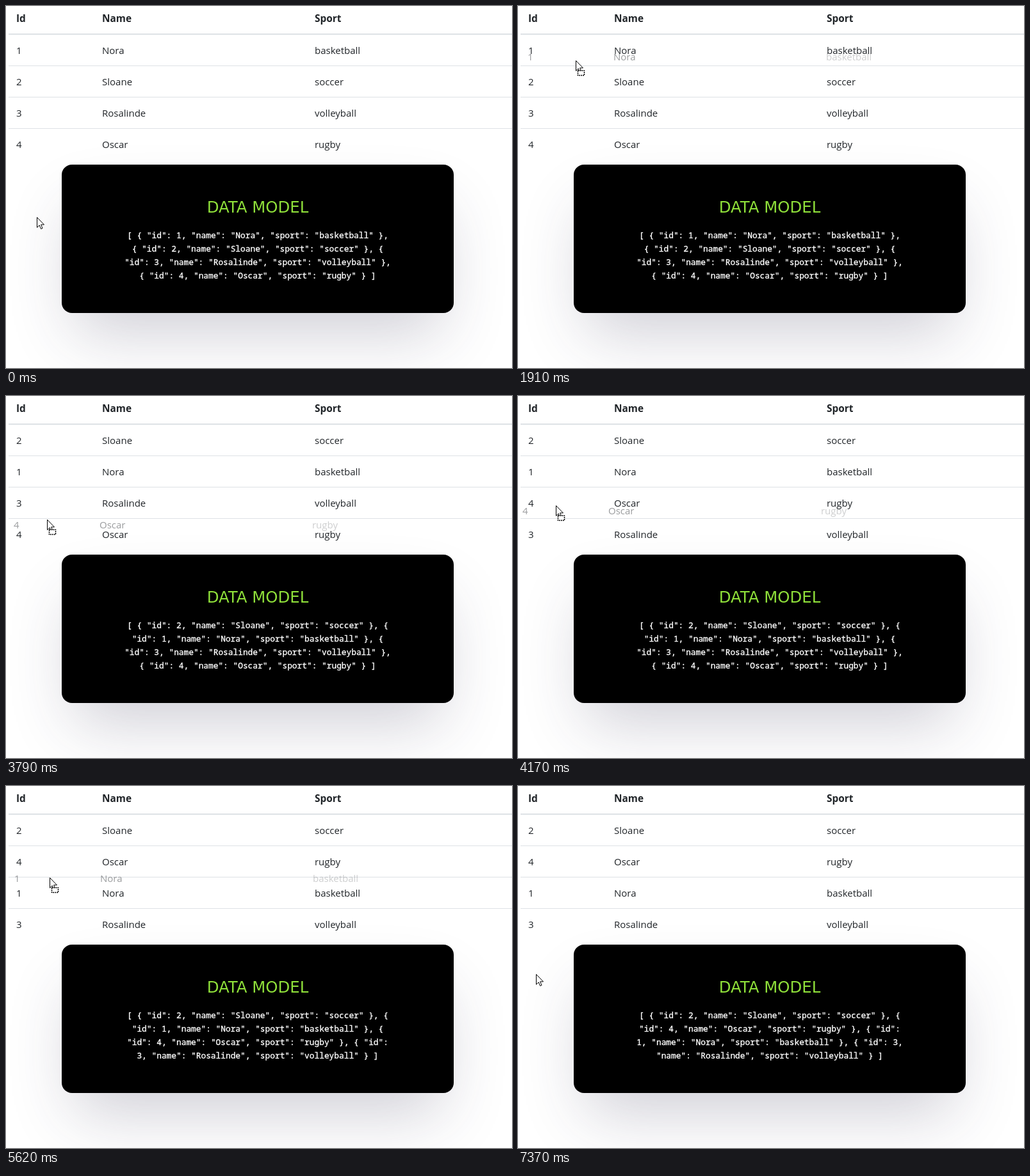
These frames come from a looping animation (790x566 px, 7690 ms). An HTML page:

```html
<!DOCTYPE html>
<html lang="en">
<head>
<meta charset="utf-8">
<title>Drag to reorder</title>
<style>
  html, body { margin: 0; width: 100%; height: 100%; overflow: hidden; background: #fff; }
  #card {
    position: absolute; left: 87px; top: 248px; width: 612px; height: 232px;
    border-radius: 16px; background: #000;
    box-shadow: 0 50px 100px -20px rgba(48, 42, 76, .23);
  }
  svg { position: absolute; left: 0; top: 0; }
  text { font: 15px "Open Sans", "Noto Sans", sans-serif; fill: #212529; }
  .head { font-size: 15.4px; font-weight: 700; }
  .title { font: 24.4px "DejaVu Sans", sans-serif; fill: #8fe03a; text-anchor: middle; }
  .model {
    font: 12.83px "Noto Sans Mono", "DejaVu Sans Mono", monospace;
    fill: #fff; stroke: #fff; stroke-width: .35; text-anchor: middle;
  }
  .line { fill: #dee2e6; }
  .cursor { fill: #fff; stroke: #000; stroke-width: 1; stroke-linejoin: round; }
</style>
</head>
<body>
<div id="card"></div>
<svg id="stage" width="790" height="566" viewBox="0 0 790 566"></svg>
<script>
const LOOP = 7690;
const COLS = [16, 150, 482];
const ROW_Y = 75, ROW_H = 49, TABLE_END = 241;
const SLOTS = [0, 1, 2, 3];
const PEOPLE = [
  ["1", "Nora", "basketball"],
  ["2", "Sloane", "soccer"],
  ["3", "Rosalinde", "volleyball"],
  ["4", "Oscar", "rugby"]
];

// Pointer moves; out = ease-out power (otherwise ease in and out), bend = sideways bulge
const HOME = { x: 48, y: 330 };
const MOVES = [
  { from: 525, to: 730, x: 38, y: 96 },
  { from: 975, to: 1470, x: 91, y: 75, out: 4, bend: [0, -4] },
  { from: 1785, to: 2230, x: 87, y: 124 },
  { from: 2860, to: 3350, x: 68, y: 210 },
  { from: 3680, to: 4120, x: 59, y: 171, out: 2 },
  { from: 4665, to: 4990, x: 71, y: 117, out: 4, bend: [-10, 0] },
  { from: 5470, to: 5800, x: 65, y: 177 },
  { from: 6220, to: 6370, x: 63, y: 171, out: 3 },
  { from: 6815, to: 7050, x: 28, y: 297 },
  { from: 7330, to: 7370, x: 28, y: 294, out: 3 }
];

// A dragged row trades slots at swap; the model follows at drop
const DRAGS = [
  { grab: 1800, swap: 1970, drop: 2430, slot: 0, goal: 1 },
  { grab: 3690, swap: 3820, drop: 4340, slot: 3, goal: 2 },
  { grab: 5480, swap: 5610, drop: 6340, slot: 1, goal: 2 }
];

const stage = document.getElementById("stage");

function add(parent, tag, attrs = {}, content = "") {
  const el = document.createElementNS("http://www.w3.org/2000/svg", tag);
  for (const key in attrs) el.setAttribute(key, attrs[key]);
  el.textContent = content;
  parent.appendChild(el);
  return el;
}
const rule = (y, height) => add(stage, "rect", { class: "line", x: 4, y, width: 786, height });
const cells = (parent, y) => COLS.map(x => add(parent, "text", { x, y }));

["Id", "Name", "Sport"].forEach((label, i) =>
  add(stage, "text", { class: "head", x: COLS[i], y: 25 }, label));
rule(43, 2);
for (let i = 0; i < 3; i++) rule(93 + i * ROW_H, 1);
const rows = SLOTS.map(i => cells(stage, ROW_Y + i * ROW_H));

add(stage, "text", { class: "title", x: 393, y: 323 }, "DATA MODEL");
const modelLines = SLOTS.map(i => add(stage, "text", { class: "model", x: 393, y: 363 + i * 21 }));

const ghost = add(stage, "g");
const ghostCells = cells(ghost, 0);
ghostCells.forEach((cell, i) => cell.setAttribute("opacity", i < 2 ? .45 : .22));

const pointer = add(stage, "g", { class: "cursor" });
const arrow = add(pointer, "path", {
  d: "M.5 .5V16.3L4.2 12.8L6.6 18.5L9 17.5L6.6 11.9H11.5Z"
});
const badge = add(pointer, "rect", {
  x: 3.5, y: 16, width: 10, height: 7.5, "stroke-width": 1.5, "stroke-dasharray": "2 1"
});
const hand = add(pointer, "path", {
  transform: "translate(-6 0)",
  d: "M5.5 14.5V2C5.5 0 8.5 0 8.5 2V9C8.5 7.3 11.5 7.3 11.5 9V9.8C11.5 8.2 14.3 8.2 14.3 10" +
     "V10.8C14.3 9.5 16.9 9.5 16.9 11.3V16.5C16.9 19 14.8 20 14.8 23.3H7C7 20.5 4 18.5 1 14.2" +
     "C-.2 12 2 11 3.5 12.5ZM8.5 9V13M11.5 9.8V13M14.3 10.8V13.5"
});

const show = (el, on) => el.setAttribute("visibility", on ? "visible" : "hidden");
const fill = (els, texts) => els.forEach((el, i) => {
  const text = texts[i] || "";
  if (el.textContent !== text) el.textContent = text;
});

// Row order once every drag whose given moment has passed is applied
function orderAt(t, moment) {
  const order = [...SLOTS];
  for (const { slot, goal, [moment]: time } of DRAGS) {
    if (t >= time) [order[slot], order[goal]] = [order[goal], order[slot]];
  }
  return order;
}

function wrap(text, limit) {
  const lines = [""];
  for (const word of text.split(" ")) {
    const last = lines[lines.length - 1];
    const next = last ? last + " " + word : word;
    if (next.length <= limit) lines[lines.length - 1] = next;
    else lines.push(word);
  }
  return lines;
}

function modelText(order) {
  const items = order.map(i => {
    const [id, name, sport] = PEOPLE[i];
    return `{ "id": ${id}, "name": "${name}", "sport": "${sport}" }`;
  });
  return wrap(`[ ${items.join(", ")} ]`, 54);
}

const ease = (k, out) => out ? 1 - (1 - k) ** out : k * k * (3 - 2 * k);

function tipAt(t) {
  let { x, y } = HOME;
  for (const m of MOVES) {
    if (t < m.from) break;
    const k = ease(Math.min(1, (t - m.from) / (m.to - m.from)), m.out);
    const [bx, by] = m.bend || [0, 0];
    const bulge = 4 * k * (1 - k);
    x += (m.x - x) * k + bx * bulge;
    y += (m.y - y) * k + by * bulge;
  }
  return [Math.round(x), Math.round(y)];
}

function draw(t) {
  const [x, y] = tipAt(t);
  const drag = DRAGS.find(d => t >= d.grab && t < d.drop);

  orderAt(t, "swap").forEach((person, i) => fill(rows[i], PEOPLE[person]));
  fill(modelLines, modelText(orderAt(t, "drop")));

  show(ghost, drag);
  if (drag) {
    const [gx, gy] = tipAt(drag.grab);
    const top = ROW_Y + drag.slot * ROW_H + y - gy;
    fill(ghostCells, PEOPLE[orderAt(drag.grab, "swap")[drag.slot]]);
    ghost.setAttribute("transform", `translate(${x - gx} ${top})`);
  }

  const overTable = !drag && y < TABLE_END;
  show(hand, overTable);
  show(arrow, !overTable);
  show(badge, drag);
  pointer.setAttribute("transform", `translate(${x} ${y})`);
}

const start = performance.now();
function tick() {
  draw((performance.now() - start) % LOOP);
  requestAnimationFrame(tick);
}
tick();
</script>
</body>
</html>
```
